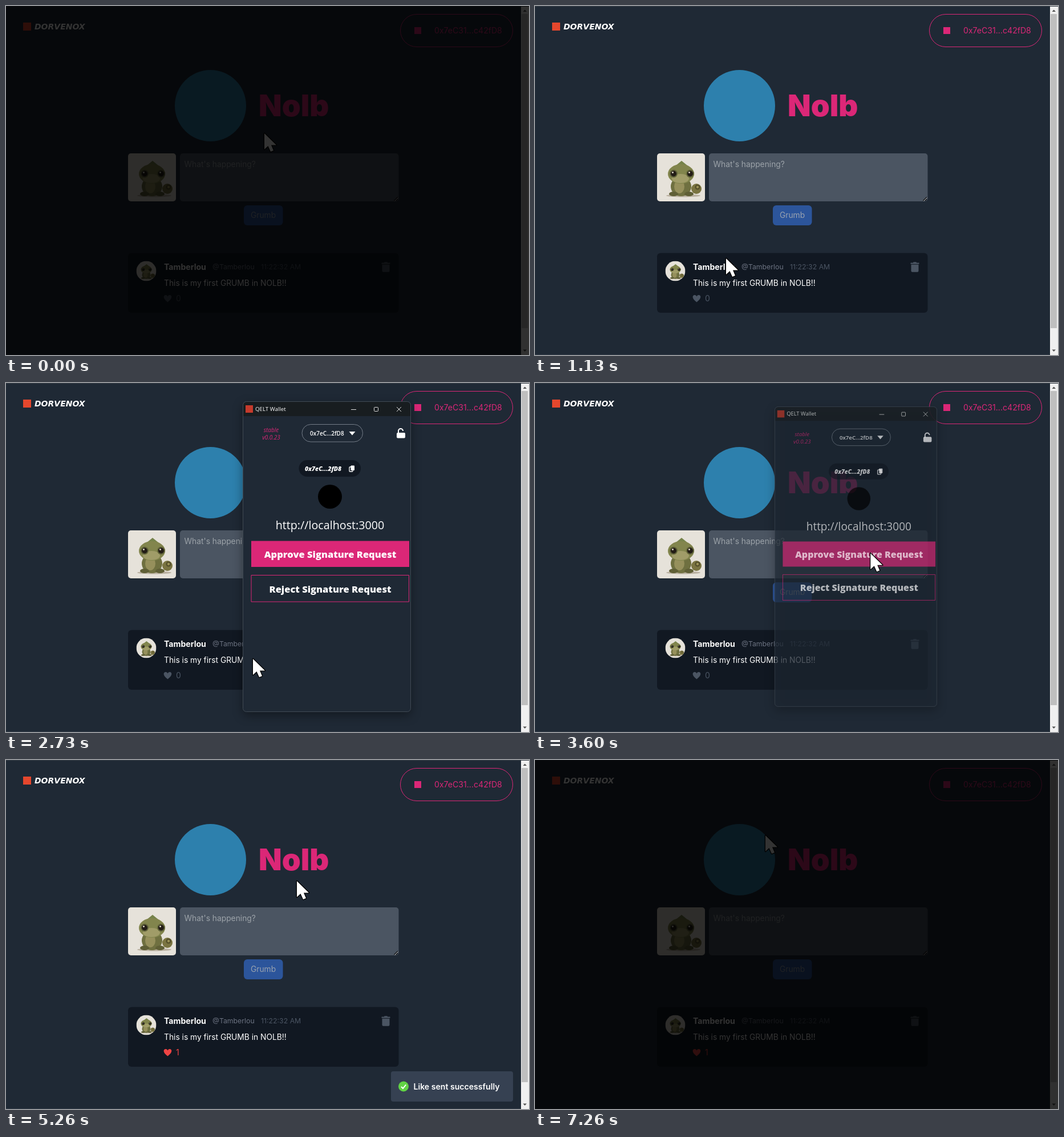
An HTML page with a canvas that plays this animation: 917 by 611 pixels, repeating every 7.33 s.

```html
<!DOCTYPE html>
<html lang="en">
<head>
<meta charset="utf-8">
<title>Nolb</title>
<style>
html, body { margin: 0; width: 100%; height: 100%; overflow: hidden; background: #000; }
canvas { display: block; }
</style>
</head>
<body>
<canvas id="stage" width="917" height="611"></canvas>
<script>
const W = 917, H = 611, LOOP = 7330, STEP = 1000 / 15;
const ctx = document.getElementById('stage').getContext('2d');
const PINK = '#db2777', BG = '#1f2935', CARD = '#111822', GRAY = '#6b7280', DIM = '#4b5563';
const UI = 'Inter, sans-serif', SYS = '"Open Sans", sans-serif';

// Pointer path: time, x, y
const PATH = [
  [0, 453, 222], [530, 453, 222], [1130, 335, 441], [1600, 280, 506], [1950, 280, 506],
  [2730, 433, 482], [3330, 588, 298], [3400, 588, 298], [4130, 589, 295],
  [5000, 510, 211], [6800, 510, 211], [7000, 404, 131]
];
const OPEN = 2000, CLOSE = 3600, LIKED = 5200, TOAST_END = 6600;

const clamp = v => Math.max(0, Math.min(1, v));

function box(x, y, w, h, r, fill, stroke, line = 1) {
  ctx.beginPath();
  ctx.roundRect(x, y, w, h, r);
  if (fill) { ctx.fillStyle = fill; ctx.fill(); }
  if (stroke) { ctx.strokeStyle = stroke; ctx.lineWidth = line; ctx.stroke(); }
}

function oval(x, y, rx, ry, fill) {
  ctx.beginPath();
  ctx.ellipse(x, y, rx, ry, 0, 0, 7);
  ctx.fillStyle = fill;
  ctx.fill();
}

const disc = (x, y, r, fill) => oval(x, y, r, r, fill);

function poly(points, fill, stroke, line = 1) {
  ctx.beginPath();
  points.forEach(([x, y]) => ctx.lineTo(x, y));
  ctx.closePath();
  if (fill) { ctx.fillStyle = fill; ctx.fill(); }
  if (stroke) { ctx.strokeStyle = stroke; ctx.lineWidth = line; ctx.stroke(); }
}

function line(x1, y1, x2, y2, color, width = 1) {
  ctx.beginPath();
  ctx.moveTo(x1, y1);
  ctx.lineTo(x2, y2);
  ctx.strokeStyle = color;
  ctx.lineWidth = width;
  ctx.stroke();
}

function text(str, x, y, font, color, align = 'left') {
  ctx.font = font;
  ctx.fillStyle = color;
  ctx.textAlign = align;
  ctx.fillText(str, x, y);
}

// Lizard portrait on an 84-unit square
function portrait(x, y, size, radius) {
  ctx.save();
  ctx.translate(x, y);
  ctx.scale(size / 84, size / 84);
  ctx.beginPath();
  ctx.roundRect(0, 0, 84, 84, radius);
  ctx.clip();
  ctx.fillStyle = '#e6e2da';
  ctx.fillRect(0, 0, 84, 84);
  oval(46, 74, 30, 2.5, '#b9b0a0');
  oval(69, 62, 9, 9, '#7a7441');
  disc(71, 59, 4.5, '#55502b');
  disc(71, 59, 2.2, '#9a9155');
  oval(42, 58, 18, 17, '#6f7040');
  oval(39, 58, 9, 12, '#96905c');
  oval(29, 71, 8, 4, '#5f5f36');
  oval(56, 71, 8, 4, '#5f5f36');
  poly([[27, 26], [43, 13], [59, 26]], '#76834a');
  oval(42, 36, 23, 17, '#82854d');
  oval(41, 44, 15, 8, '#a09c68');
  for (const ex of [29, 58]) {
    disc(ex, 35.5, 7, '#62653a');
    disc(ex, 35.5, 5, '#231d16');
    disc(ex - 1.5, 33.5, 1.4, '#e8e2d2');
  }
  ctx.restore();
}

function heart(x, y, color) {
  ctx.beginPath();
  ctx.moveTo(x, y + 6.5);
  ctx.bezierCurveTo(x - 10, y - 1, x - 7, y - 6, x - 3.6, y - 6);
  ctx.quadraticCurveTo(x - 1, y - 6, x, y - 3.6);
  ctx.quadraticCurveTo(x + 1, y - 6, x + 3.6, y - 6);
  ctx.bezierCurveTo(x + 7, y - 6, x + 10, y - 1, x, y + 6.5);
  ctx.fillStyle = color;
  ctx.fill();
}

function header() {
  box(30, 29, 14, 14, 0, '#e5472d');
  text('DORVENOX', 50, 41, 'italic bold 14px "DejaVu Sans", sans-serif', '#fff');
  box(691.5, 14.5, 197, 57, 28.5, null, PINK);
  box(716, 37, 12, 12, 0, PINK);
  text('0x7eC31...c42fD8', 751, 48, '14.1px ' + UI, PINK);
  disc(358.5, 174.5, 62.5, '#2d80ad');
  text('Nolb', 443, 193, '900 52.8px ' + UI, PINK);
}

function composer() {
  portrait(214, 258, 84, 5);
  box(305, 258, 383.5, 84, 5, '#4b5562');
  text("What's happening?", 312.5, 282, '13.8px ' + UI, '#9ca3a9');
  line(680.5, 341, 687, 334.5, '#111', 1.2);
  line(681.5, 341.5, 687.5, 335.5, '#ddd', 0.8);
  line(684, 341, 687, 338, '#111', 1.2);
  box(417, 349, 68.5, 35, 6, '#2c559b');
  text('Grumb', 451, 371, '13.8px ' + UI, '#9aa3b0', 'center');
}

function post(liked) {
  box(214, 432.5, 474.5, 104.5, 6, CARD);
  portrait(228.5, 446.5, 35, 42);
  text('Tamberlou', 277, 462, 'bold 14.1px ' + UI, '#fff');
  text('@Tamberlou', 362, 460.5, '12.3px ' + UI, GRAY);
  text('11:22:32 AM', 447, 460.5, '12.3px ' + UI, DIM);
  text('This is my first GRUMB in NOLB!!', 277, 490, '13.8px ' + UI, '#fff');
  const color = liked ? '#ef4444' : DIM;
  heart(283.5, 512, color);
  text(liked ? '1' : '0', 298, 517, '14.1px ' + UI, color);
  box(658.5, 449.5, 15, 2.2, 0.5, DIM);
  box(663, 448.2, 6, 2, 1, DIM);
  box(659.5, 452.8, 13, 13, [0, 0, 2, 2], DIM);
}

function scrollbar() {
  ctx.fillStyle = '#f0f0f0';
  ctx.fillRect(903, 0, 14, H);
  ctx.fillStyle = '#bfbfbf';
  ctx.fillRect(904, 14, 11, 550);
  poly([[906.5, 10], [909.7, 6.5], [913, 10]], '#505050');
  poly([[906.5, 601.5], [909.7, 605], [913, 601.5]], '#505050');
}

function wallet(show) {
  ctx.save();
  ctx.globalAlpha = show;
  const s = 0.9 + 0.1 * show;
  ctx.translate(562.5, 304);
  ctx.scale(s, s);
  ctx.translate(-562.5, -304);
  ctx.shadowColor = 'rgba(0,0,0,.4)';
  ctx.shadowBlur = 18;
  ctx.shadowOffsetY = 6;
  box(415.5, 32.5, 294, 543, 6, BG);
  ctx.shadowColor = 'transparent';
  box(416, 33, 293, 25, [6, 6, 0, 0], '#181d20');
  box(415.5, 32.5, 294, 543, 6, null, '#414a54');

  box(420, 39, 13, 13, 0, '#c53a2c');
  text('QELT Wallet', 437, 49, '9.7px ' + SYS, '#fff');
  line(605, 46.5, 614, 46.5, '#ddd');
  box(645.5, 42.5, 7, 7, 1, null, '#ddd');
  line(685, 42, 693, 50, '#ddd');
  line(693, 42, 685, 50, '#ddd');

  text('stable', 465, 86, 'italic 10px ' + SYS, PINK, 'center');
  text('v0.0.23', 465, 99, 'italic 10px ' + SYS, PINK, 'center');
  box(519, 72.5, 106.5, 30.5, 15.2, null, '#747d88');
  text('0x7eC...2fD8', 533, 92, '600 10px ' + SYS, '#fff');
  poly([[601.5, 85], [612.5, 85], [607, 91.5]], '#fff');
  box(685, 87, 15, 9.5, 2, '#fff');
  ctx.beginPath();
  ctx.moveTo(688, 88);
  ctx.lineTo(688, 84);
  ctx.arc(692, 84, 4, Math.PI, 0);
  ctx.strokeStyle = '#fff';
  ctx.lineWidth = 2;
  ctx.stroke();

  box(513.5, 135, 108.5, 29, 14.5, CARD);
  text('0x7eC...2fD8', 524, 153.5, 'italic 800 10.5px ' + SYS, '#fff');
  box(602, 147, 6, 8, 1, null, '#fff', 1.3);
  box(604.5, 144.5, 6.5, 8.5, 1, '#fff');
  disc(568, 199, 21, '#000');
  text('http://localhost:3000', 568, 256, '19.7px ' + SYS, '#fff', 'center');
  box(430, 276.5, 277, 45.5, 0, PINK);
  text('Approve Signature Request', 568.5, 306, '800 16.5px ' + SYS, '#fff', 'center');
  box(430, 336.5, 276.5, 46.5, 0, null, PINK);
  text('Reject Signature Request', 568.5, 366.5, '800 16.5px ' + SYS, '#fff', 'center');
  ctx.restore();
}

function toast(show) {
  ctx.save();
  ctx.globalAlpha = show;
  ctx.translate(0, 24 * (1 - show));
  box(675, 545, 214, 53, 4, '#364152');
  disc(697, 571.5, 9, '#61d345');
  ctx.beginPath();
  ctx.moveTo(693, 572);
  ctx.lineTo(696, 575);
  ctx.lineTo(701.2, 568.5);
  ctx.strokeStyle = '#fff';
  ctx.lineWidth = 2;
  ctx.stroke();
  text('Like sent successfully', 714.5, 577, '600 14.1px ' + UI, '#fff');
  ctx.restore();
}

function pointerAt(t) {
  const i = PATH.findIndex(p => p[0] > t);
  if (i < 0) return PATH[PATH.length - 1].slice(1);
  const [t0, x0, y0] = PATH[i - 1], [t1, x1, y1] = PATH[i];
  const u = (t - t0) / (t1 - t0);
  return [x0 + (x1 - x0) * u, y0 + (y1 - y0) * u];
}

function pointer(x, y, beam) {
  ctx.save();
  ctx.translate(x, y);
  ctx.lineJoin = 'round';
  if (beam) {
    for (const [color, grow] of [['#000', 1.5], ['#fff', 0]]) {
      ctx.fillStyle = color;
      for (const [w, h, cy] of [[18, 3, -14.5], [18, 3, 14.5], [3, 30, 0]])
        ctx.fillRect(-w / 2 - grow, cy - h / 2 - grow, w + 2 * grow, h + 2 * grow);
    }
  } else {
    const arrow = [[0, 1], [0, 29], [6.5, 23], [11, 33], [16, 31], [12, 21.5], [21, 21.5]];
    poly(arrow, '#fff', '#000', 2.5);
    poly(arrow, '#fff');
  }
  ctx.restore();
}

function draw(now) {
  const frame = Math.min(109, Math.floor((now % LOOP + 7) / STEP));
  const t = Math.floor(frame * STEP / 10 + 0.01) * 10;

  ctx.fillStyle = BG;
  ctx.fillRect(0, 0, W, H);
  header();
  composer();
  post(t >= LIKED);
  scrollbar();
  line(0, 0.5, W, 0.5, '#343c45');
  line(0, 610.5, 902, 610.5, '#303a46');

  const show = t < CLOSE ? clamp((t - OPEN + 70) / 210) : clamp(1 - (t - CLOSE + 70) / 210);
  if (show > 0) wallet(show);

  if (t >= LIKED && t < TOAST_END + 60)
    toast(t === LIKED || t >= TOAST_END ? 0.5 : 1);

  const [x, y] = pointerAt(t);
  const beam = !show && x > 305 && x < 688 && y > 258 && y < 342;
  pointer(x, y, beam);

  const light = Math.min(1, 0.2 * (frame + 1), 0.2 * (110 - frame));
  if (light < 1) {
    ctx.fillStyle = `rgba(0,0,0,${1 - light})`;
    ctx.fillRect(0, 0, W, H);
  }
}

const start = performance.now();
function tick() {
  draw(performance.now() - start);
  requestAnimationFrame(tick);
}
tick();
</script>
</body>
</html>
```
